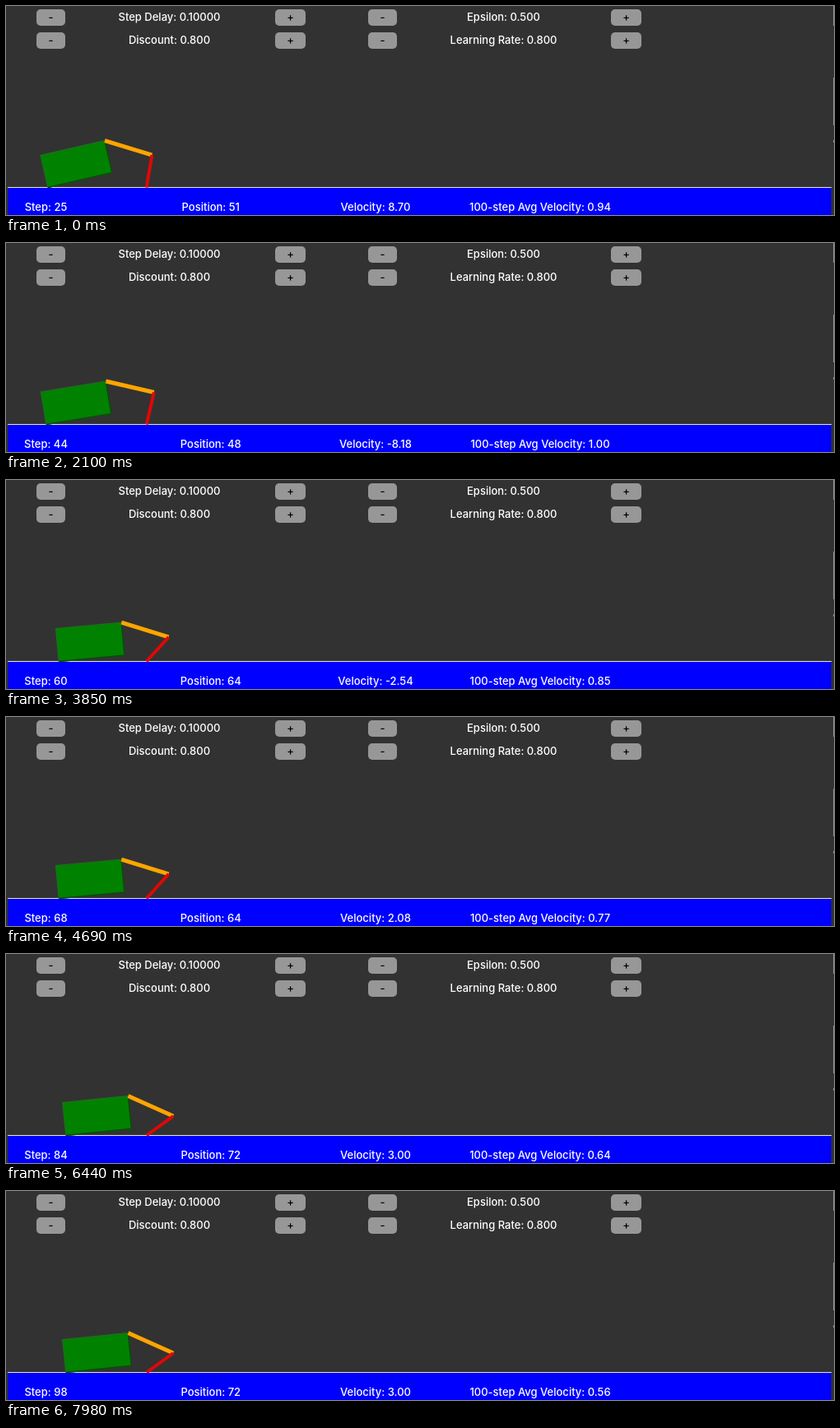
These frames come from a looping animation (1006 by 254 pixels, 8000 ms). An HTML page:

```html
<!DOCTYPE html>
<html lang="en">
<head>
<meta charset="utf-8">
<title>Crawling robot</title>
<style>
  html, body { margin: 0; width: 100%; height: 100%; overflow: hidden; background: #323232; }
  svg { display: block; width: 1006px; height: 254px; }
  text { font: 500 13px Inter, "Open Sans", sans-serif; fill: #fff; text-anchor: middle; }
  .btn text { fill: #000; }
  .btn rect { fill: #979797; }
</style>
</head>
<body>
<svg id="stage" viewBox="0 0 1006 254">
  <g id="panel"></g>
  <path d="M1005.5 0V24M1005.5 87V145M1005.5 163V166" stroke="#8a8a8a"/>
  <rect x="2.5" y="220" width="1000" height="34" fill="#00f"/>
  <rect x="2" y="220" width="1001" height="1" fill="#e6e4d4"/>
  <g transform="translate(.5 .5)">
    <polygon id="body" fill="#008200" stroke="#1c701c" stroke-width="1.4"/>
    <polyline id="shade" fill="none" stroke="#0b480b" stroke-width="1.6"/>
    <line id="arm" stroke="#ffa500" stroke-width="5"/>
    <line id="hand" stroke="#de0808" stroke-width="4"/>
  </g>
  <g id="stats"></g>
</svg>
<script>
const NS = "http://www.w3.org/2000/svg";
const $ = id => document.getElementById(id);

function add(parent, tag, attrs, text) {
  const el = document.createElementNS(NS, tag);
  set(el, attrs);
  if (text) el.textContent = text;
  parent.appendChild(el);
  return el;
}
function set(el, attrs) {
  for (const key in attrs) el.setAttribute(key, attrs[key]);
}

// Control panel
function button(x, y, w, label) {
  const g = add($("panel"), "g", { class: "btn" });
  add(g, "rect", { x, y, width: w, height: 20, rx: 5 });
  add(g, "text", { x: x + w / 2, y: y + 14 }, label);
}
function control(x, y, label) {
  button(x, y, 35, "-");
  button(x + (x < 400 ? 290 : 295), y, 37, "+");
  add($("panel"), "text", { x: x < 400 ? 198.5 : 604.5, y: y + 14 }, label);
}
control(37, 4, "Step Delay: 0.10000");
control(440, 4, "Epsilon: 0.500");
control(37, 32, "Discount: 0.800");
control(440, 32, "Learning Rate: 0.800");

const stats = [48.5, 248.8, 449, 649].map(x => add($("stats"), "text", { x, y: 249 }));

// Robot geometry
const W = 80, H = 40, ARM = 60, HAND = 40, GROUND = 220, CONTACT = 170.25, START = 20;
const rad = deg => deg * Math.PI / 180;

function pose(a, h) {
  const arm = rad(-30 + 7.5 * a), hand = rad(-150 + 12.5 * h);
  const x = W + ARM * Math.cos(arm) + HAND * Math.cos(hand);
  const y = H + ARM * Math.sin(arm) + HAND * Math.sin(hand);
  return { arm, hand, tilt: Math.atan(-y / x), pos: CONTACT - Math.hypot(x, y) };
}

// One letter per step: arm up / down, hand left / right
const MOVES = "lruldllurldr" + "urrlrlrdlrlllrr" + "luduldruldrlurud" +
              "dlrrlrllu" + "drlurldudrludu" + "dududud";
const FIRST = 25, TICK = 70, LOOP = 8000;
// Steps last one or two ticks in turn; these repeat the long one
const LONG = [26, 43, 52, 63, 68, 83, 94, 97];

function simulate() {
  let a = 0, h = 3, avg = 0.94, tick = 0, long = false;
  let state = { ...pose(a, h), step: FIRST, vel: 8.7, avg, tick };
  const list = [state];
  for (const m of MOVES) {
    long = !long || LONG.includes(state.step);
    tick += long ? 2 : 1;
    a += (m === "u") - (m === "d");
    h += (m === "r") - (m === "l");
    const next = pose(a, h), step = state.step + 1;
    avg = 0.9 * avg + 0.1 * (next.pos - START) / (step + 1);
    state = { ...next, step, vel: next.pos - state.pos, avg, tick };
    list.push(state);
  }
  return list;
}
const states = simulate();

const polar = ([x, y], len, angle) => [x + len * Math.cos(angle), y - len * Math.sin(angle)];
const line = (el, p, q) => set(el, { x1: p[0], y1: p[1], x2: q[0], y2: q[1] });

function draw(s) {
  const rearLow = [s.pos, GROUND];
  const frontLow = polar(rearLow, W, s.tilt);
  const rearTop = polar(rearLow, H, s.tilt + Math.PI / 2);
  const frontTop = polar(rearTop, W, s.tilt);
  const elbow = polar(frontTop, ARM, s.arm + s.tilt);
  const tip = polar(elbow, HAND, s.hand + s.tilt);
  set($("body"), { points: [rearLow, frontLow, frontTop, rearTop].join(" ") });
  set($("shade"), { points: [rearLow, frontLow, frontTop].join(" ") });
  line($("arm"), frontTop, elbow);
  line($("hand"), elbow, tip);
  [
    `Step: ${s.step}`,
    `Position: ${s.pos.toFixed(0)}`,
    `Velocity: ${s.vel.toFixed(2)}`,
    `100-step Avg Velocity: ${s.avg.toFixed(2)}`
  ].forEach((text, i) => { stats[i].textContent = text; });
}

const t0 = performance.now();
let shown = null;
function frame() {
  const tick = Math.floor(((performance.now() - t0) % LOOP) / TICK);
  const s = states.filter(st => st.tick <= tick).pop();
  if (s !== shown) draw(shown = s);
  requestAnimationFrame(frame);
}
frame();
</script>
</body>
</html>
```
